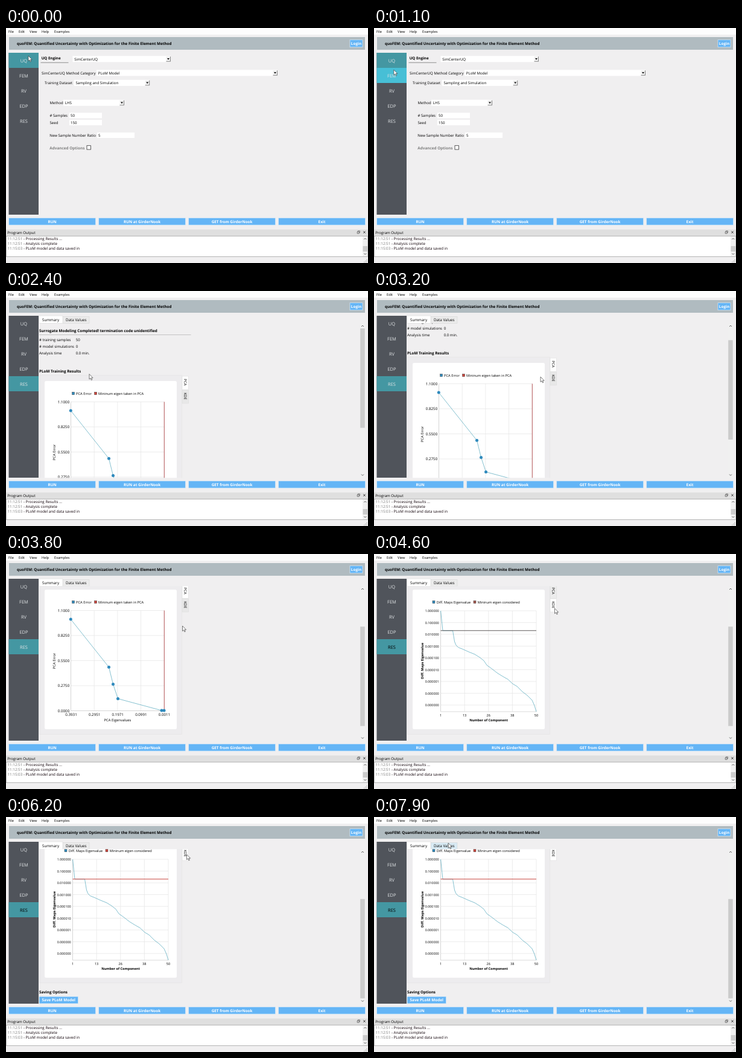
Write an HTML page that moves like this. It is 600 px wide and 389 px high and loops after 8000 ms.

```html
<!DOCTYPE html>
<html lang="en">
<head>
<meta charset="utf-8">
<title>quoFEM</title>
<style>
html, body { margin: 0; height: 100%; overflow: hidden; background: #f0eff0; }
svg { display: block; width: 100%; height: 100%; }
text { font-family: "Open Sans", "Noto Sans", sans-serif; text-rendering: geometricPrecision; white-space: pre; }
</style>
</head>
<body>
<svg id="stage" viewBox="0 0 600 389"></svg>
<script>
const BLUE = '#64b5f6', GRID = '#e4e4e4', CURVE = '#4fa5bb', DOT = '#2f8abd', RED = '#c8443c';

const rect = (x, y, w, h, fill, extra = '') =>
  `<rect x="${x}" y="${y}" width="${w}" height="${h}" fill="${fill}" ${extra}/>`;
const path = (d, stroke, width = 0.7) =>
  `<path d="${d}" fill="none" stroke="${stroke}" stroke-width="${width}"/>`;
const text = (x, y, s, size = 6.1, extra = '') =>
  `<text x="${x}" y="${y}" font-size="${size}" ${extra}>${s}</text>`;
const bold = (x, y, s, size = 6.3, extra = '') => text(x, y, s, size, 'font-weight="700" ' + extra);
const MID = 'text-anchor="middle" ', END = 'text-anchor="end" ';
const turned = (x, y, deg) => `${MID}transform="rotate(${deg} ${x} ${y})"`;
const range = n => [...Array(n).keys()];

const button = (x, y, w, h, s) =>
  rect(x, y, w, h, BLUE, 'stroke="#d3e8f9" stroke-width=".7"') +
  bold(x + w / 2, y + h / 2 + 2.3, s, 6.4, MID + 'fill="#fff"');
const combo = (x, y, w, s) =>
  rect(x, y, w, 10, '#fff') + text(x + 2.8, y + 7.3, s) +
  rect(x + w - 7, y + 1, 7, 8, '#f0f0f0') +
  path(`M${x + w - 7} ${y + 9}h7v-8`, '#555') +
  `<path d="M${x + w - 5.5} ${y + 3.8}h4l-2 2.6z" fill="#111"/>`;
const field = (x, y, w, s) => rect(x, y, w, 9, '#fff') + text(x + 2, y + 7, s);
const arrow = (x, y, dir) => path(`M${x - 2} ${y + dir}l2 ${-2 * dir}l2 ${2 * dir}`, '#555', 0.9);
const marker = (x, y, fill, id = '') => rect(x, y, 4, 4.4, fill, `${id} stroke="#444" stroke-width=".5"`);

function frameParts() {
  const menu = [[4, 'File'], [21, 'Edit'], [39, 'View'], [59, 'Help'], [80, 'Examples']];
  const log = ['11:12:51 - Processing Results ...', '11:12:51 - Analysis complete',
    '11:15:03 - PLoM model and data saved in'];
  const labels = ['RUN', 'RUN at GirderNook', 'GET from GirderNook', 'Exit'];
  return rect(0, 0, 600, 11, '#fdfdfd') + menu.map(([x, s]) => text(x, 7.6, s, 5.7)).join('') +
    rect(5, 15, 590, 21, '#b0bbc0') +
    bold(18, 28, 'quoFEM: Quantified Uncertainty with Optimization for the Finite Element Method') +
    button(570, 19.7, 21, 12, 'Login') +
    labels.map((s, i) => button(4.7 + 149 * i, 314.4, 143.8, 11.7, s)).join('') +
    rect(0, 333.5, 600, 10.5, '#dfdfdf') + text(2.3, 340.7, 'Program Output') +
    path('M582.2 337.2h3v3h-3zM583.4 337v-1.2h3v3h-1', '#333', 0.6) +
    path('M592.3 336.3l3.4 3.6m0 -3.6l-3.4 3.6', '#222', 0.8) +
    rect(0.5, 344.5, 599, 34, '#fff', 'stroke="#9a9a9a" stroke-width=".7"') +
    log.map((s, i) => text(2.5, 350.7 + 8 * i,
      `<tspan fill="#777">${s.slice(0, 8)}</tspan>${s.slice(8)}`, 6.25, 'fill="#100008"')).join('') +
    rect(591, 345, 8.3, 33, '#f0f0f0') + rect(591.5, 361, 7.5, 9, '#cbcbcb') +
    arrow(595.3, 349, 1) + arrow(595.3, 374, -1) +
    path('M593 387.5h1.2m1 0h1.2m1 0h1.2m-3.4 -2h1.2m1 0h1.2m-1.2 -2h1.2', '#aaa', 1.1);
}

function engineParts() {
  return bold(58.7, 52, 'UQ Engine', 6.2) + path('M57.5 57.3H103.5', '#777', 0.8) +
    combo(110.5, 46.3, 162, 'SimCenterUQ') +
    text(59, 76.6, 'SimCenterUQ Method Category') + combo(150, 69.3, 299.5, 'PLoM Model') +
    text(64, 93, 'Training Dataset') + combo(112.7, 85.8, 125, 'Sampling and Simulation') +
    text(72.5, 126, 'Method') + combo(95, 118.8, 100.5, 'LHS') +
    text(72.5, 147.2, '# Samples') + field(105, 140.3, 54, '50') +
    text(72.5, 158.8, 'Seed') + field(105, 152, 54, '150') +
    text(72.3, 180, 'New Sample Number Ratio') + field(151, 173, 62, '5') +
    bold(72.3, 200.5, 'Advanced Options', 6.4, 'fill="#808080"') +
    rect(134, 194.7, 6.4, 6.4, '#fff', 'stroke="#333" stroke-width=".8"');
}

// Both charts share a plot box with five vertical grid lines.
function grid(x, y, w, h, rows, step) {
  return path(range(5).map(i => `M${x + w * i / 4} ${y}v${h}`).join('') +
    range(rows).map(i => `M${x} ${y + step * i}h${w}`).join(''), GRID) +
    path(`M${x} ${y}v${h}h${w}`, '#ccc');
}

function pcaChart() {
  const pts = [[107.3, 198], [170.5, 277.3], [177.5, 305.5], [185.5, 329.5], [258, 349], [262, 349]];
  const xs = ['0.3931', '0.2951', '0.1971', '0.0991', '0.0011'];
  const ys = ['1.1000', '0.8250', '0.5500', '0.2750', '0.0000'];
  return grid(107.5, 183.5, 154.7, 166, 5, 41.5) +
    xs.map((s, i) => text(108 + 38.6 * i, 358.2, s, 6.2, MID)).join('') +
    ys.map((s, i) => text(105.2, 185.8 + 41.5 * i, s, 6.2, END)).join('') +
    text(185, 367, 'PCA Eigenvalues', 5.9, MID) + text(82, 267, 'PCA Error', 5.9, turned(82, 267, -90)) +
    marker(109.5, 167.3, DOT) + text(116, 171.8, 'PCA Error', 5.75) +
    marker(146.5, 167.3, RED) + text(153, 171.8, 'Mininum eigen taken in PCA', 5.75) +
    path('M262.3 183.5v166', '#b0484a', 0.9) + path('M' + pts.join('L'), CURVE) +
    pts.map(([x, y]) => `<circle cx="${x}" cy="${y}" r="2.5" fill="${DOT}"/>`).join('');
}

function kdeChart() {
  const pts = [[110.5, 184], [114, 216.8], [130.5, 216.8], [133.5, 235], [136, 241], [139.5, 244.5],
    [147, 247.5], [157, 252], [167, 256], [175, 261], [182, 266.5], [187, 274], [196, 280.5],
    [205, 287.5], [214, 293], [222, 297.5], [230, 305], [237, 309], [246, 318], [254, 324],
    [262, 332], [266, 341], [269, 351]];
  return grid(110.5, 184, 158.5, 167, 9, 19.5) +
    range(9).map(i => text(107.7, 186.4 + 19.5 * i, (10 ** -i).toFixed(6), 5.4, END)).join('') +
    [1, 13, 26, 38, 50].map((n, i) => text(110.5 + 39.6 * i, 358.5, n, 5.6, MID)).join('') +
    bold(190, 367, 'Number of Component', 5.55, MID) +
    bold(81.7, 267, 'Diff. Maps Eigenvalue', 5.6, turned(81.7, 267, -90)) +
    marker(97, 167.3, DOT) + text(103.7, 171.8, 'Diff. Maps Eigenvalue', 5.65) +
    marker(165, 167.3, RED, 'id="limitKey"') + text(171.7, 171.8, 'Mininum eigen considered', 5.65) +
    path('M' + pts.join('L'), CURVE) +
    '<path id="limit" d="M110.5 216.8H269" stroke-width="1"/>';
}

function resultParts() {
  const rows = [['# training samples', '50'], ['# model simulations', '0'], ['Analysis time', '0.0 min.']];
  return bold(55, 68, 'Surrogate Modeling Completed! termination code unidentified') +
    path('M55 72.5H306.5', '#b0b0b0') +
    rows.map(([a, b], i) => text(55, 83.2 + 10.9 * i, a) + text(115.7, 83.2 + 10.9 * i, b)).join('') +
    bold(55, 135, 'PLoM Training Results') +
    rect(55.5, 139.5, 236, 249, '#edecee', 'stroke="#e6e6e6" stroke-width=".7"') +
    rect(64, 149, 219, 231, '#fff', 'rx="2.5"') +
    `<g id="pca">${pcaChart()}</g><g id="kde">${kdeChart()}</g>` +
    rect(292, 141, 10.5, 22.5, '', 'id="pcaTab" stroke="#dcdcdc" stroke-width=".6"') +
    rect(292, 164, 10.5, 22, '', 'id="kdeTab" stroke="#dcdcdc" stroke-width=".6"') +
    text(295.4, 151, 'PCA', 6.1, turned(295.4, 151, 90)) +
    text(295.4, 174, 'KDE', 6.1, turned(295.4, 174, 90)) +
    bold(55, 406.3, 'Saving Options') + button(55, 411.2, 64.5, 11.7, 'Save PLoM Model');
}

const sections = ['UQ', 'FEM', 'RV', 'EDP', 'RES'];
const $ = id => document.getElementById(id);
$('stage').innerHTML = `<clipPath id="view"><rect x="54" y="53.3" width="533" height="256"/></clipPath>` +
  rect(0, 0, 600, 389, '#f0eff0') + frameParts() + rect(4.5, 41, 49.5, 268, '#50545b') +
  sections.map((s, i) => rect(4.5, 41 + 25 * i, 49.5, 25, 'none', `id="row${i}"`) +
    text(29.5, 57.4 + 25 * i, s, 7.5, `${MID}fill="#dfe3e5" id="name${i}"`)).join('') +
  `<g id="engine">${engineParts()}</g><g id="results">` +
  rect(94, 42.3, 44, 11, '', 'id="dataTab" stroke="#d5d5d5" stroke-width=".6"') +
  rect(55, 41, 39, 12.5, '#fff', 'stroke="#d9d9d9" stroke-width=".6"') +
  text(60, 49.7, 'Summary', 6.25) + text(99, 49.7, 'Data Values', 6.3) +
  `<g clip-path="url(#view)"><g id="page">${resultParts()}</g></g>` +
  rect(587, 53.5, 8, 255.5, '#f0f0f0') + rect(587.2, 62, 7.5, 164.5, '#cbcbcb', 'id="thumb"') +
  arrow(591, 58, 1) + arrow(591, 304.5, -1) + '</g>' +
  '<path id="pointer" d="M0 0V8.6L2 6.8L3.4 9.9L4.8 9.3L3.4 6.3H6.1Z" fill="#fff" stroke="#333" stroke-width=".65"/>';

// Pointer path: time in ms, x, y.
const moves = [[0, 37, 46], [400, 21, 55], [900, 33, 46], [1000, 33, 50], [1500, 32, 146], [1600, 31.5, 149],
  [1800, 28, 148], [2100, 28, 148], [2400, 138, 137.5], [2800, 276, 142], [3500, 276, 142],
  [3800, 292.5, 119], [4000, 295, 113], [4400, 299.5, 90], [4800, 299.5, 90], [5500, 299.5, 62],
  [6300, 299.5, 62], [6900, 95, 308], [7000, 95, 308], [7500, 128, 32], [7900, 123, 43], [8000, 123, 43]];
const scrolls = [[3200, 30], [3400, 60], [3600, 90], [5900, 114]];

function pointerAt(t) {
  const i = moves.findIndex(m => m[0] > t), [t0, x0, y0] = moves[i - 1], [t1, x1, y1] = moves[i];
  const u = (t - t0) / (t1 - t0);
  return [x0 + (x1 - x0) * u, y0 + (y1 - y0) * u];
}
const set = (id, name, value) => $(id).setAttribute(name, value);
const show = (id, on) => set(id, 'display', on ? 'inline' : 'none');

function draw(now) {
  const t = Math.floor(now % 8000 / 100) * 100;
  const [x, y] = pointerAt(t);
  const over = (l, top, r, b) => x >= l && x < r && y >= top && y < b;
  const done = t >= 1800, kde = t >= 4500, dull = t < 5800;
  const scroll = scrolls.reduce((s, [at, v]) => t >= at ? v : s, 0);

  sections.forEach((_, i) => {
    const chosen = i === (done ? 4 : 0);
    set('row' + i, 'fill', chosen ? '#4497a2' : over(5, 41 + 25 * i, 54, 66 + 25 * i) ? '#47bfd6' : 'none');
  });
  set('name4', 'fill', kde ? '#000' : '#dfe3e5');
  show('engine', !done);
  show('results', done);
  show('pca', !kde);
  show('kde', kde);
  set('limit', 'stroke', dull ? '#5c5758' : RED);
  set('limitKey', 'fill', dull ? '#a2554c' : RED);
  set('pcaTab', 'fill', kde ? '#ececec' : '#fff');
  set('kdeTab', 'fill', kde ? '#fff' : over(292, 164 - scroll, 303, 186 - scroll) ? '#d8eaf6' : '#e8e8e8');
  set('dataTab', 'fill', over(94, 41, 138, 53) ? '#d8eaf4' : '#ebebeb');
  set('page', 'transform', `translate(0 ${-scroll})`);
  set('thumb', 'y', 62 + scroll * 0.647);
  set('pointer', 'transform', `translate(${x} ${y})`);
}

const start = performance.now();
function tick() {
  draw(performance.now() - start);
  requestAnimationFrame(tick);
}
tick();
</script>
</body>
</html>
```
